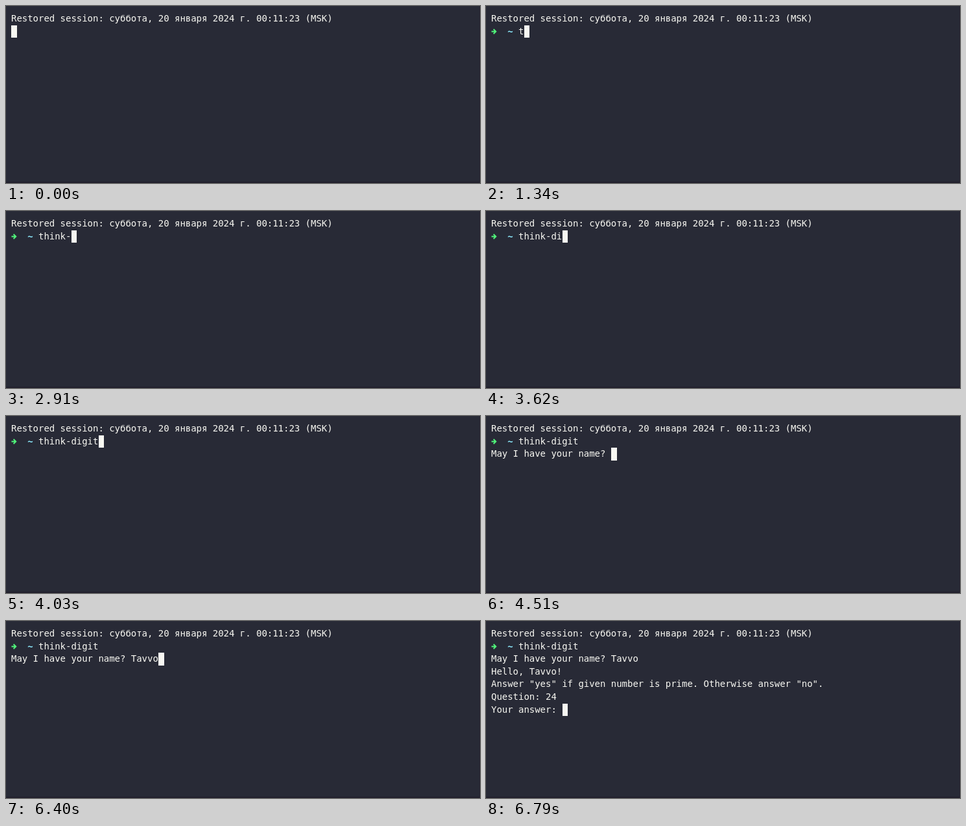
An HTML page with a canvas that plays this animation: 731x274 px, repeating every 8000 ms.

```html
<!DOCTYPE html>
<html lang="en">
<head>
<meta charset="utf-8">
<title>Terminal session</title>
<style>
html, body { margin: 0; width: 100%; height: 100%; overflow: hidden; background: #282a36; }
canvas { display: block; }
</style>
</head>
<body>
<canvas id="term" width="731" height="274"></canvas>
<script>
const LOOP = 8000, LEFT = 8, TOP = 10, COL = 8.4, ROW = 19.6;
const INK = '#f8f8f2', GREEN = '#50fa7b', CYAN = '#8be9fd';
const PROMPT_AT = 110, ENTER_AT = 4510, REPLY_AT = 6790;

const command = 'think-digit';
const commandKeys = [1340, 1440, 1540, 1790, 1970, 2910, 3290, 3620, 3710, 3910, 4030];
const user = 'Tavvo';
const userKeys = [5580, 5750, 6060, 6140, 6400];

const ctx = document.getElementById('term').getContext('2d');

const rowY = row => Math.round(TOP + ROW * row);
const colX = col => Math.ceil(LEFT + COL * col - 1e-6);
const typed = (text, keys, t) => text.slice(0, keys.filter(k => k <= t).length);

// Writes on the character grid and returns the column after the text.
function write(text, row, col = 0, color = INK, weight = 400) {
  ctx.font = `${weight} 14px "DejaVu Sans Mono", "Noto Sans Mono", monospace`;
  ctx.fillStyle = color;
  for (const ch of text) ctx.fillText(ch, LEFT + COL * col++, rowY(row) + 14);
  return col;
}

function cursor(row, col) {
  const x = colX(col), y = rowY(row);
  ctx.fillStyle = INK;
  ctx.fillRect(x, y, colX(col + 1) - x, rowY(row + 1) - y);
}

function promptArrow(row) {
  const y = rowY(row) + 9.5;
  ctx.strokeStyle = GREEN;
  ctx.lineWidth = 2;
  ctx.beginPath();
  ctx.moveTo(8.5, y);
  ctx.lineTo(15, y);
  ctx.moveTo(11.6, y - 3.6);
  ctx.lineTo(15.2, y);
  ctx.lineTo(11.6, y + 3.6);
  ctx.stroke();
}

function draw(t) {
  ctx.fillStyle = '#282a36';
  ctx.fillRect(0, 0, 731, 274);
  ctx.fillStyle = '#211f2c';
  ctx.fillRect(730, 0, 1, 274);
  ctx.fillRect(0, 272, 731, 2);

  write('Restored session: суббота, 20 января 2024 г. 00:11:23 (MSK)', 0);
  let row = 1, col = 0;
  if (t >= PROMPT_AT) {
    promptArrow(1);
    write('~', 1, 3, CYAN, 700);
    col = write(typed(command, commandKeys, t), 1, 5);
  }
  if (t >= ENTER_AT) {
    row = 2;
    col = write('May I have your name? ' + typed(user, userKeys, t), 2);
  }
  if (t >= REPLY_AT) {
    const reply = [
      `Hello, ${user}!`,
      'Answer "yes" if given number is prime. Otherwise answer "no".',
      'Question: 24',
      'Your answer: '
    ];
    for (const line of reply) col = write(line, ++row);
  }
  cursor(row, col);
}

const start = performance.now();
function tick() {
  draw((performance.now() - start) % LOOP);
  requestAnimationFrame(tick);
}
tick();
</script>
</body>
</html>
```
